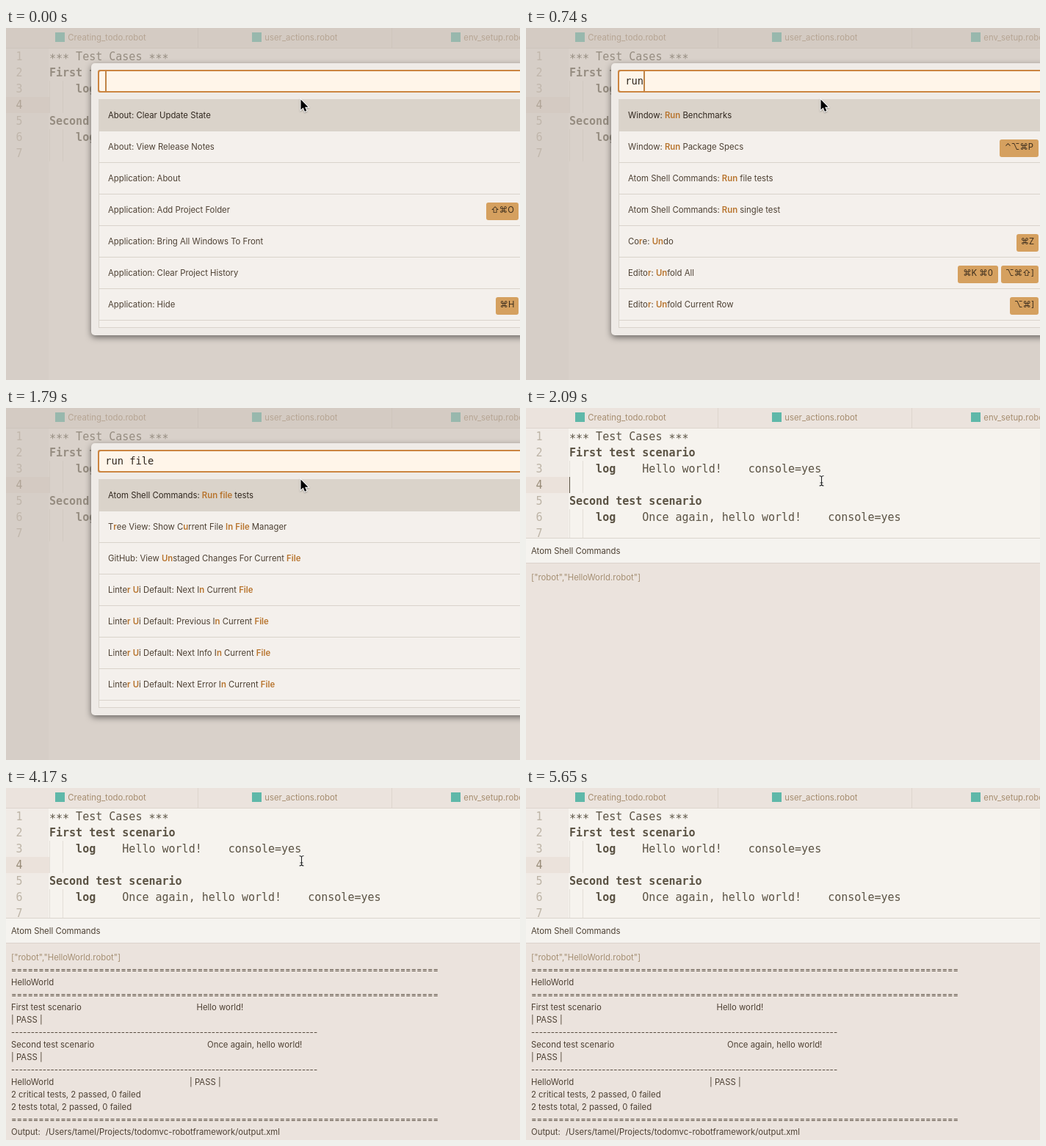
Write an HTML page with a canvas that moves like this. It is 700 by 480 pixels and loops after 5750 ms.

```html
<!DOCTYPE html>
<html lang="en">
<head>
<meta charset="utf-8">
<title>Running a test file from the command palette</title>
<style>
  html, body { margin: 0; width: 100%; height: 100%; overflow: hidden; }
  canvas { display: block; width: 700px; height: 480px; }
</style>
</head>
<body>
<canvas id="stage" width="700" height="480"></canvas>
<script>
const ctx = document.getElementById('stage').getContext('2d');
const LOOP = 5750;
const RUN_AT = 2090;
const OUTPUT_AT = 2390;
const SANS = '11.35px Inter, "Noto Sans", "DejaVu Sans", sans-serif';
const MONO = '15px "DejaVu Sans Mono", monospace';
const INPUT = '13.7px "DejaVu Sans Mono", monospace';
const INK = '#4d4033';

// Asterisks mark matched letters; a second entry lists [keys, badge width].
const runRows = [
  ['Window: *Run* Benchmarks'],
  ['Window: *Run* Package Specs', [['⌃⌥⌘P', 53]]],
  ['Atom Shell Commands: *Run* file tests'],
  ['Atom Shell Commands: *Run* single test'],
  ['Co*r*e: *Un*do', [['⌘Z', 30]]],
  ['Edito*r*: *Un*fold All', [['⌥⌘⇧]', 51], ['⌘K ⌘0', 55]]],
  ['Edito*r*: *Un*fold Current Row', [['⌥⌘]', 39]]]
];
const fileRows = [
  ['Atom Shell Commands: *Run file* tests'],
  ['T*r*ee View: Show C*u*rrent File *In* *File* Manager'],
  ['GitHub: View *Un*staged Changes For Current *File*'],
  ...['Next', 'Previous', 'Next Info', 'Next Error'].map(
    step => [`Linte*r* *U*i Default: ${step} I*n* Current *File*`])
];
const shorten = (rows, found, marked) =>
  rows.map(([label, keys]) => [label.replaceAll(found, marked), keys]);
const fiRows = shorten(fileRows, 'ile*', 'i*le');
fiRows.splice(1, 0, ['Edito*r*: *Unf*old At *I*ndent Level 1', [['⌘K ⌘1', 55]]]);

const palette = [
  [0, '', [
    ['About: Clear Update State'],
    ['About: View Release Notes'],
    ['Application: About'],
    ['Application: Add Project Folder', [['⇧⌘O', 44]]],
    ['Application: Bring All Windows To Front'],
    ['Application: Clear Project History'],
    ['Application: Hide', [['⌘H', 31]]]
  ]],
  [300, 'r', [
    ['Core: *R*edo', [['⇧⌘Z', 43]]],
    ['Window: *R*eload', [['⌃⌥⌘L', 53]]],
    ['Window: *R*un Benchmarks'],
    ['Window: *R*un Package Specs', [['⌃⌥⌘P', 53]]],
    ['Tree View: *R*ename'],
    ['Tree View: *R*emove'],
    ['Window: *R*eset Font Size', [['⌘0', 30]]]
  ]],
  [450, 'ru', [
    ...shorten(runRows.slice(0, 6), 'n*', '*n'),
    ['Edito*r*: *U*pper Case', [['⌘K ⌘U', 55]]]
  ]],
  [740, 'run', runRows],
  [890, 'run ', [
    ...runRows.slice(0, 4), ...runRows.slice(5),
    ['T*r*ee View: Show C*u*rrent File I*n* File Manager']
  ]],
  [1190, 'run fi', fiRows.slice(0, 7)],
  [1340, 'run fil', shorten(fileRows, 'ile*', 'il*e')],
  [1490, 'run file', fileRows]
];

const blinks = [2530, 2980, 3270, 3720, 4170, 4470, 4910, 5360, 5650];

function rect(x, y, w, h, color) {
  ctx.fillStyle = color;
  ctx.fillRect(x, y, w, h);
}

function box(x, y, w, h, r, color) {
  ctx.beginPath();
  ctx.roundRect(x, y, w, h, r);
  ctx.fillStyle = color;
  ctx.fill();
}

function text(str, x, y, color = INK, font = SANS, align = 'left') {
  ctx.font = font;
  ctx.fillStyle = color;
  ctx.textAlign = align;
  ctx.fillText(str, x, y);
}

function drawTabs() {
  rect(0, 0, 700, 27, '#ebe3dd');
  rect(0, 27, 700, 1, '#ddd5cd');
  rect(261, 0, 1, 27, '#ddd5cd');
  rect(525, 0, 1, 27, '#ddd5cd');
  for (const [x, name] of [[67, 'Creating_todo'], [335, 'user_actions'], [606, 'env_setup']]) {
    rect(x, 6, 13, 13, '#5fb8a9');
    text(name + '.robot', x + 17.3, 17, '#a58c6e');
  }
}

function drawEditor() {
  rect(0, 28, 700, 452, '#f6f3ee');
  rect(0, 28, 58, 452, '#f0ebe6');
  rect(0, 94, 59, 22, '#ebe2db');
  for (const y of [72, 138]) {
    rect(59, y, 1, 44, '#e4dfd8');
    rect(77, y, 1, 44, '#e4dfd8');
  }
  for (let n = 1; n <= 7; n++) {
    text(n, 22.5, 22 + n * 22, n === 4 ? '#978a76' : '#bdb4a6', MONO, 'right');
  }
  const code = (str, column, line, weight = '') =>
    text(str, 59 + column * 9.03, 22 + line * 22, '#5b5344', weight + MONO);
  code('***', 0, 1.14);
  code('Test Cases', 4, 1);
  code('***', 15, 1.14);
  code('First test scenario', 0, 2, 'bold ');
  code('log', 4, 3, 'bold ');
  code('Hello world!    console=yes', 11, 3);
  code('Second test scenario', 0, 5, 'bold ');
  code('log', 4, 6, 'bold ');
  code('Once again, hello world!    console=yes', 11, 6);
}

function drawLabel(label, y, selected) {
  let x = 139;
  label.split('*').forEach((part, i) => {
    const matched = i % 2 === 1;
    text(part, x, y, matched ? '#b8752f' : selected ? '#30271e' : INK,
      (matched ? '600 ' : '') + SANS);
    x += ctx.measureText(part).width;
  });
}

function drawPalette(t) {
  const [, query, rows] = palette.findLast(([start]) => t >= start);
  rect(0, 0, 700, 480, 'rgba(195, 185, 177, 0.57)');

  ctx.save();
  ctx.shadowColor = 'rgba(0, 0, 0, 0.5)';
  ctx.shadowBlur = 9;
  ctx.shadowOffsetY = 3;
  box(116, 48, 640, 371, 5, '#efebe7');
  ctx.restore();

  box(125, 57, 640, 31, 3, '#cb8541');
  box(127, 59, 640, 27, 2, '#fff5e9');
  text(query, 135.3, 77, '#30271e', INPUT);
  if (t < 1790) rect(Math.round(135 + query.length * 8.25), 59, 2, 27, '#c08447');

  rect(126, 97, 640, 312, '#d9d3cb');
  rect(127, 97, 640, 311, '#f4f0ec');
  rows.forEach(([label, keys = []], i) => {
    const y = 97 + i * 43;
    if (i === 0) rect(127, y, 640, 43, '#dad3ca');
    rect(127, y + 43, 640, 1, '#d9d3cb');
    drawLabel(label, y + 26, i === 0);
    let right = 698;
    for (const [keystroke, width] of keys) {
      box(right - width, y + 42 - 30, width, 24, 3, '#d5a05f');
      text(keystroke, right - width / 2, y + 28 - 2, '#3a2c1d', SANS, 'center');
      right -= width + 4;
    }
  });
}

function rule(mark, pitch, y) {
  for (let i = 0; i < 78; i++) text(mark, 7 + i * pitch, y);
}

function drawConsole(t) {
  rect(0, 177, 700, 1, '#dbd5ce');
  rect(0, 178, 700, 33, '#f5f3ef');
  rect(0, 211, 700, 1, '#dbd3cc');
  rect(0, 212, 700, 268, '#ebe3dd');
  text('Atom Shell Commands', 7, 199);
  text('["robot","HelloWorld.robot"]', 7, 235, '#a58f73');
  if (t < OUTPUT_AT) return;

  const row = n => 235 + n * 17;
  for (const n of [1, 3, 13]) rule('=', 7.46, row(n));
  for (const n of [6, 9]) rule('-', 5.35, row(n));
  const lines = [
    [2, 7, 'HelloWorld'],
    [4, 7, 'First test scenario'], [4, 259.5, 'Hello world!'],
    [5, 7, '| PASS |'],
    [7, 7, 'Second test scenario'], [7, 274, 'Once again, hello world!'],
    [8, 7, '| PASS |'],
    [10, 7, 'HelloWorld'], [10, 250, '| PASS |'],
    [11, 7, '2 critical tests, 2 passed, 0 failed'],
    [12, 7, '2 tests total, 2 passed, 0 failed'],
    [14, 7, 'Output:'], [14, 54, '/Users/tamel/Projects/todomvc-robotframework/output.xml']
  ];
  for (const [n, x, str] of lines) text(str, x, row(n));
}

function drawArrow(x, y) {
  ctx.save();
  ctx.translate(x, y);
  ctx.shadowColor = 'rgba(0, 0, 0, 0.3)';
  ctx.shadowBlur = 2;
  ctx.shadowOffsetY = 1;
  ctx.lineWidth = 2;
  ctx.strokeStyle = '#fff';
  ctx.fillStyle = '#000';
  const arrow = new Path2D('M0 0V14L3.2 11L5.4 16.2L7.8 15.2L5.6 10.2H10Z');
  ctx.stroke(arrow);
  ctx.shadowColor = 'transparent';
  ctx.fill(arrow);
  ctx.restore();
}

function drawIBeam(x, y) {
  const beam = new Path2D('M-3 -6.5Q0 -6.5 0 -4.5Q0 -6.5 3 -6.5M0 -4.5V5M-3 7Q0 7 0 5Q0 7 3 7M-2 3H2');
  ctx.save();
  ctx.translate(x, y);
  for (const [width, color] of [[2.6, 'rgba(255, 255, 255, 0.7)'], [1.1, '#222']]) {
    ctx.lineWidth = width;
    ctx.strokeStyle = color;
    ctx.stroke(beam);
  }
  ctx.restore();
}

function drawPointer(t) {
  if (t < RUN_AT) drawArrow(401.5, 97.5);
  else if (t < 4620) drawIBeam(402.5, 99);
  else if (t < 4760) drawArrow(454.5, 337.5);
  else if (t < 4910) drawArrow(466.5, 437.5);
}

function draw(now) {
  const t = now % LOOP;
  drawEditor();
  drawTabs();
  if (t < RUN_AT) {
    drawPalette(t);
  } else {
    const toggles = blinks.filter(time => t >= time).length;
    if (toggles % 2 === 0) rect(59, 94, 1, 22, '#5b5344');
    drawConsole(t);
  }
  drawPointer(t);
  requestAnimationFrame(draw);
}

requestAnimationFrame(draw);
</script>
</body>
</html>
```
